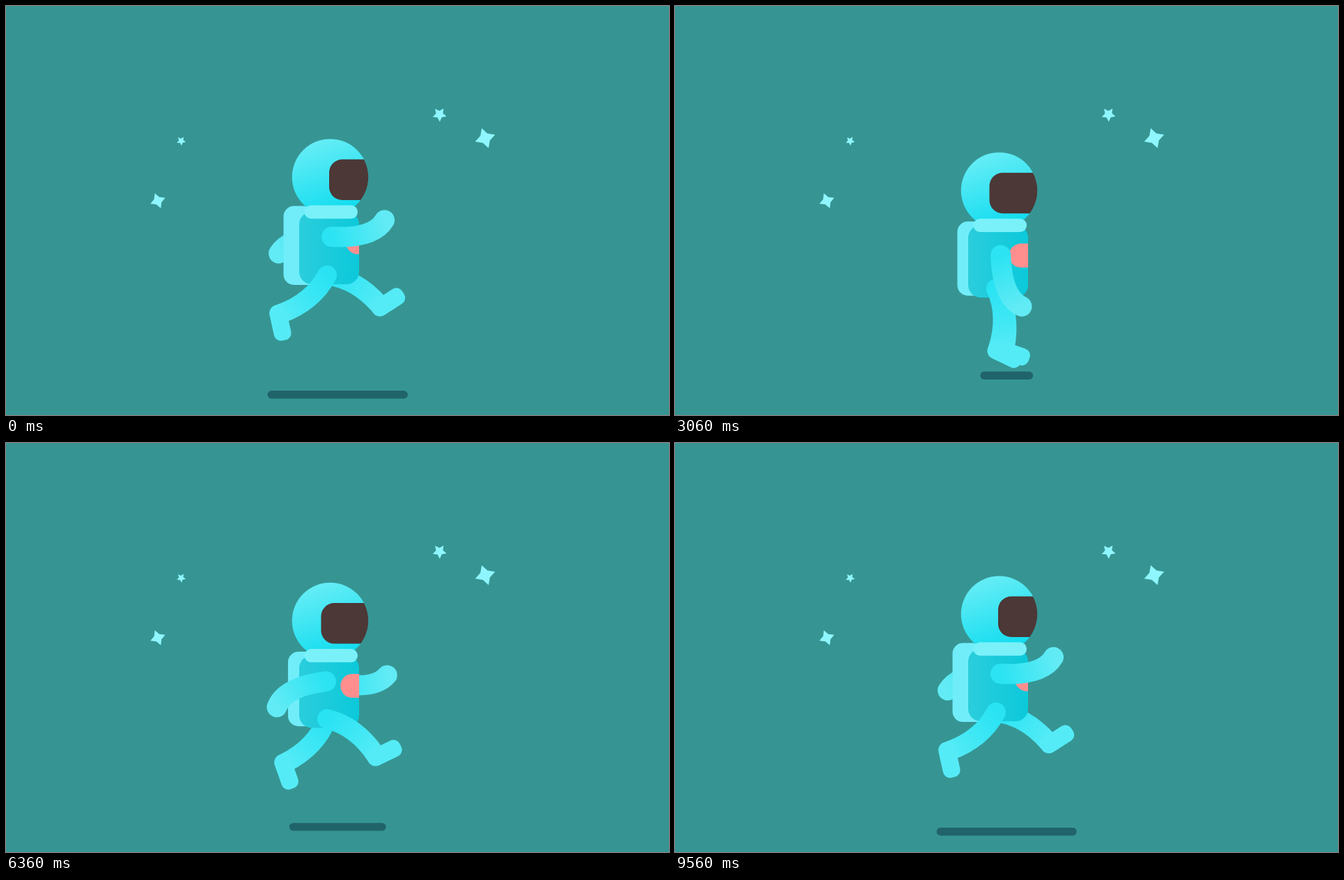
An HTML page with a canvas for the animation above (9580 ms loop, 952 by 588 pixels).

```html
<!DOCTYPE html>
<html lang="en">
<head>
<meta charset="utf-8">
<title>Running astronaut</title>
<style>
  html, body { margin: 0; width: 100%; height: 100%; overflow: hidden; background: #369593; }
  canvas { display: block; width: 100vw; height: 100vh; }
</style>
</head>
<body>
<canvas id="stage" width="952" height="588"></canvas>
<script>
const ctx = document.getElementById('stage').getContext('2d');
const LOOP = 9580, CYCLE = 4800, STEP = 2400;
const RAD = Math.PI / 180;

const mix = (a, b, k) => a + (b - a) * k;
const wave = u => (1 - Math.cos(Math.PI * u)) / 2;

// Same curve as CSS cubic-bezier(x1, y1, x2, y2).
function bezier(x1, y1, x2, y2) {
  const at = (a, b, s) => 3 * (1 - s) * (1 - s) * s * a + 3 * (1 - s) * s * s * b + s * s * s;
  return x => {
    let lo = 0, hi = 1;
    for (let i = 0; i < 24; i++) {
      const mid = (lo + hi) / 2;
      if (at(x1, x2, mid) < x) lo = mid; else hi = mid;
    }
    return at(y1, y2, lo);
  };
}

const stride = bezier(.3, 0, .07, 1);

// Limbs swing from one extreme to the other in a step, then return.
function swing(from, to, time) {
  const t = time % CYCLE;
  return t < STEP ? mix(from, to, stride(t / STEP)) : mix(to, from, stride(t / STEP - 1));
}

const armAngle = time => swing(107.5, -73.5, time);
const footAngle = time => swing(77.5, -33, time);

// Quick drop in the first part of a step, slow rise in the rest.
function sink(u) {
  const low = .295;
  return u < low ? wave(u / low) : 1 - wave((u - low) / (1 - low));
}

const turn = time => 1 - Math.abs(Math.cos(Math.PI * time / CYCLE)) ** 3;

function gradient(x0, y0, x1, y1, from, to) {
  const g = ctx.createLinearGradient(x0, y0, x1, y1);
  g.addColorStop(0, from);
  g.addColorStop(1, to);
  return g;
}

function box(x, y, w, h, r, fill) {
  ctx.fillStyle = fill;
  ctx.beginPath();
  ctx.roundRect(x, y, w, h, r);
  ctx.fill();
}

// Round-ended bent tube starting at the local origin.
function tube(cx, cy, x, y, width, stroke) {
  ctx.lineCap = 'round';
  ctx.lineWidth = width;
  ctx.strokeStyle = stroke;
  ctx.beginPath();
  ctx.moveTo(0, 0);
  ctx.quadraticCurveTo(cx, cy, x, y);
  ctx.stroke();
}

function star(x, y, tips, outer, inner, angle) {
  ctx.fillStyle = '#8ff6ff';
  ctx.beginPath();
  for (let i = 0; i < tips * 2; i++) {
    const a = angle * RAD + i * Math.PI / tips, r = i % 2 ? inner : outer;
    ctx.lineTo(x + r * Math.cos(a), y + r * Math.sin(a));
  }
  ctx.fill();
}

function arm(x, y, offset, angle) {
  ctx.save();
  ctx.translate(x, y);
  ctx.rotate((107.5 - angle) * RAD);
  ctx.translate(offset, 0);
  tube(60, 3, 76, -24, 29, gradient(0, 0, 78, -22, '#2be3f2', '#62ebf5'));
  ctx.restore();
}

function leg(angle) {
  ctx.save();
  ctx.translate(461, 387);
  ctx.rotate(angle * RAD);
  tube(33, 28, 39.7, 77, 28, gradient(0, 0, 40, 78, '#29e3f3', '#55ebf6'));
  box(26, 68, 52, 25, [8, 10, 10, 12], '#55ebf6');
  ctx.restore();
}

function head(facing, time) {
  ctx.save();
  ctx.beginPath();
  ctx.arc(465.5, 246, 54.8, 0, 7);
  ctx.fillStyle = gradient(448, 194, 483, 296, '#65edf6', '#10dcef');
  ctx.fill();
  ctx.clip();
  box(464 - 13.5 * facing, 220.5, 110, 58.5, 19, '#4c3836');

  // The glint crosses the visor once per cycle.
  ctx.clip();
  const x = 485 + (time - 3200) * .36;
  ctx.fillStyle = '#ffcbcb';
  ctx.beginPath();
  ctx.moveTo(x, 220.5);
  ctx.lineTo(x + 18.5, 220.5);
  ctx.lineTo(x + 3, 279);
  ctx.lineTo(x - 15.5, 279);
  ctx.fill();
  ctx.restore();
}

function torso(facing) {
  box(398.5 + 7.5 * facing, 287.5 + 3.4 * facing, 60, 113.5 - 7.4 * facing, 15, '#70edf9');
  ctx.save();
  box(421, 296, 86, 104, 18, gradient(421, 0, 507, 0, '#2bcddc', '#0bc9da'));
  ctx.clip();
  box(488 - 9 * facing, 322.4, 60, 34.4, 17, '#ff8f8f');
  ctx.restore();
}

function draw(time) {
  const t = time % CYCLE;
  const low = sink(t % STEP / STEP), facing = turn(t);

  ctx.fillStyle = '#369593';
  ctx.fillRect(0, 0, 952, 588);
  star(688, 190, 4, 15.2, 7.6, -19);
  star(218, 280, 4, 11.5, 5.7, -22);
  star(622.5, 156, 5, 10.4, 5.2, 88);
  star(251.5, 194, 5, 6.8, 3.3, 85);

  const width = 201.5 - 127 * low;
  box(476.2 - width / 2, 553 - 28 * low * low, width, 11.4, 5.7, '#20646a');

  ctx.save();
  ctx.translate(0, 19.4 * low);
  arm(468, 333, 0, armAngle(t + STEP));
  leg(footAngle(t + STEP));
  torso(facing);
  head(facing, t);
  box(428.5, 286.5, 76.5, 19.3, 9.65, '#7af1f9');
  leg(footAngle(t));
  arm(460.3 + 7.3 * facing, 331.8, 7.2, armAngle(t));
  ctx.restore();
}

const start = performance.now();
function tick() {
  draw((performance.now() - start) % LOOP);
  requestAnimationFrame(tick);
}
tick();
</script>
</body>
</html>
```
